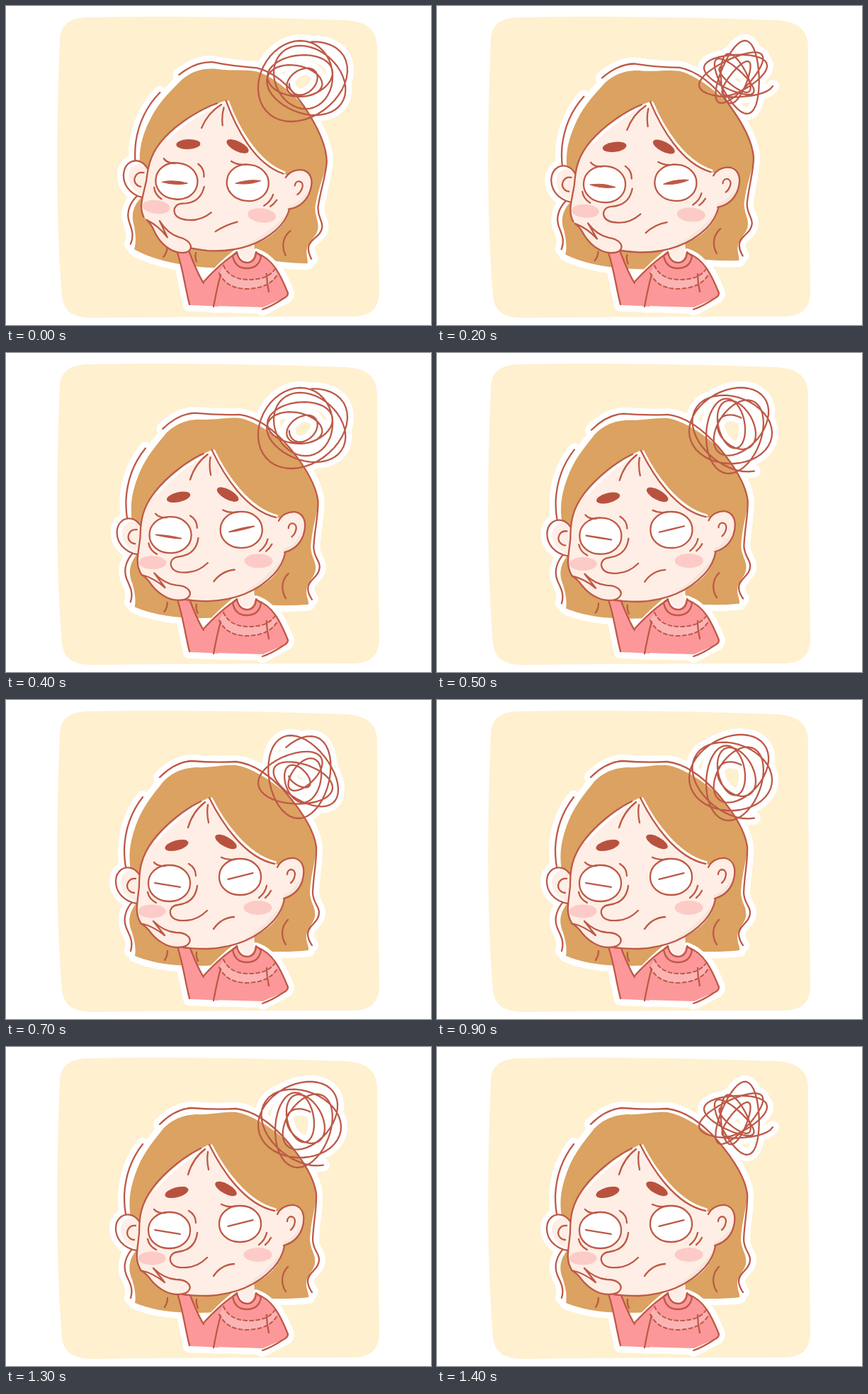
Write an HTML page that moves like this. It is 600 by 450 pixels and loops after 1500 ms.

```html
<!DOCTYPE html>
<html lang="en">
<head>
<meta charset="utf-8">
<title>Tired girl</title>
<style>
  html, body { margin: 0; width: 100%; height: 100%; overflow: hidden; background: #fff; }
  svg { display: block; width: 600px; height: 450px; }
  .line { fill: none; stroke: #be5947; stroke-width: 2.3; stroke-linecap: round; stroke-linejoin: round; }
  .halo { fill: #fff; stroke: #fff; stroke-width: 18; stroke-linecap: round; stroke-linejoin: round; }
  .open { fill: none; }
  .gap { fill: none; stroke: #fff; stroke-width: 3.5; stroke-linecap: round; }
  .wide { stroke-width: 8; }
  .hair { fill: #dba261; }
  .skin { fill: #feeee5; }
  .shade { fill: #f6e6da; }
  .blush { fill: #fccbc7; }
  .white { fill: #fff; }
  .knit { fill: #fc9899; }
  .band { fill: #fbb4b4; }
  .brow { fill: #b8523f; }
  .dash { stroke-dasharray: 5 4; stroke-width: 2; }
</style>
</head>
<body>
<svg viewBox="0 0 600 450">
  <defs>
    <path id="hair" d="M222 115C236 101 250 96 268 95C290 96 305 91 325 92C345 95 375 113 395 132C420 158 435 185 438 206C438 225 430 245 429 272C430 288 438 292 436 306C433 318 424 322 424 334C424 343 428 348 427 353Q392 357 345 353L322 352L300 374Q225 379 182 361C184 350 181 338 178 328C171 312 174 298 186 284L188 245L176 240C172 215 176 195 186 170C195 148 208 133 222 115Z"/>
    <path id="locks" d="M217 109C230 96 244 87 262 86C285 88 305 88 325 87C350 90 375 108 397 133C420 160 435 185 438 207C439 228 434 245 433 272C434 288 442 290 442 300C442 314 426 318 426 330C426 338 429 341 432 346M193 137C175 160 168 185 167 210C167 222 168 232 170 240M180 283C170 293 164 308 170 322C175 333 180 341 176 354"/>
    <path id="earL" d="M188 246C181 236 171 234 163 239C152 247 153 264 162 275C169 283 177 286 185 287"/>
    <path id="earR" d="M383 236C387 227 397 222 407 223C420 226 423 240 418 256C413 270 403 277 392 280"/>
    <path id="sleeve" d="M242 348L258 345C264 360 270 377 279 391L303 368L300 424L259 421C252 393 250 372 242 348Z"/>
    <path id="torso" d="M279 389C291 376 308 359 326 348L352 348C376 355 388 380 398 405Q398 410 390 413L363 425L259 422Z"/>
    <path id="collar" d="M326 347C328 358 334 362 341 362C348 362 353 356 353 347L360 353C358 365 350 370 340 370C329 370 322 364 320 352Z"/>
  </defs>

  <path fill="#fff0d0" d="M76 48Q76 18 112 16Q300 13 480 20C508 22 524 32 524 60Q524 230 527 405C526 425 516 438 490 438Q300 438 125 440C92 440 82 430 79 410Q67 260 76 48Z"/>

  <g class="halo">
    <path class="open tangle"/>
    <g class="tilt">
      <use href="#hair"/><use href="#locks" class="open"/>
      <use href="#earL"/><use href="#earR"/>
    </g>
    <use href="#sleeve"/><use href="#torso"/>
    <path d="M362 428L396 410"/>
  </g>

  <g class="tilt">
    <use href="#hair" class="hair"/>
    <use href="#locks" class="line"/>
    <path class="line" d="M228 354Q228 361 224 367M269 356Q268 362 271 368M398 310C388 320 388 334 395 345"/>
  </g>

  <path class="gap wide" d="M284 386C296 372 310 359 325 347M353 346Q374 353 385 374"/>
  <use href="#torso" class="knit"/>
  <use href="#sleeve" class="knit"/>
  <path class="white" d="M323 335L325 349Q331 361 341 361Q350 358 351 348L350 330Z"/>
  <path class="skin" d="M328 335L329 350Q334 359 341 359Q348 356 350 348L349 330Z"/>
  <path class="band" d="M307 366C314 382 329 386 342 386C360 386 372 382 380 371L383 379C374 394 357 399 338 399C319 398 308 391 301 377Z"/>
  <use href="#collar" class="knit"/>
  <use href="#collar" class="line"/>
  <path class="line dash" d="M307 366C314 382 329 386 342 386C360 386 372 382 380 371M301 377C308 391 319 398 338 399C357 399 374 394 383 379"/>
  <path class="line" d="M242 348C250 372 252 393 259 421M258 345C264 360 270 377 279 391M279 389C291 376 308 359 326 348M303 379C299 393 296 408 293 424M368 378Q368 390 371 403M355 349C377 357 388 380 398 405Q398 410 391 413C382 419 374 424 362 428"/>

  <g class="tilt">
    <use href="#earL" class="white"/>
    <path class="skin" d="M190 248C180 237 171 240 165 247C158 259 163 277 187 286Z"/>
    <use href="#earL" class="line"/>
    <path class="line" d="M183 252C172 251 168 263 174 269Q177 272 181 272"/>

    <path class="skin" d="M286 138C262 148 228 172 207 199C190 222 188 240 188 262C186 285 181 300 190 314L225 336C240 346 262 351 285 351C325 349 355 336 378 311C386 302 391 292 393 281L400 235L379 231C345 222 310 180 286 138Z"/>
    <path class="shade" d="M393 283C378 304 361 322 335 338C365 332 389 309 393 283Z"/>
    <use href="#earR" class="skin"/>
    <path class="shade" d="M416 250C411 262 402 271 391 275L392 281C405 277 415 267 416 250Z"/>
    <path class="gap" d="M286 141C262 151 230 176 211 200M290 139C306 171 339 219 380 229"/>
    <path class="line" d="M275 143C254 153 225 175 207 199C190 222 188 240 188 262C186 285 181 300 190 314M250 349C262 351 272 351 285 351C325 349 355 336 378 311C386 302 391 292 393 281M287 138C304 172 336 222 379 231"/>
    <path class="line" d="M281 144C268 154 261 166 257 180M285 148Q283 160 286 173M397 246C397 237 408 237 408 246Q407 254 402 258"/>
    <use href="#earR" class="line"/>

    <ellipse class="blush" cx="206" cy="298" rx="19.5" ry="9.5"/>
    <ellipse class="blush" cx="355.5" cy="293" rx="20" ry="10"/>

    <ellipse id="browL" class="brow" rx="17" ry="7"/>
    <ellipse id="browR" class="brow" rx="17" ry="7"/>

    <g class="line" style="fill:#fff">
      <rect x="201" y="233" width="59" height="51" rx="28" ry="25"/>
      <rect x="301" y="224" width="59" height="51" rx="28" ry="25"/>
    </g>
    <path id="slitL" class="line" style="fill:#be5947"/>
    <path id="slitR" class="line" style="fill:#be5947"/>
    <path class="line" d="M209 229Q214 235 225 234M304 222Q314 227 326 224M258 231Q268 237 268 248M200 271Q202 281 212 286M357 279Q366 272 368 262M366 279Q371 275 374 269"/>
    <path class="line" d="M270 262C268 279 258 287 243 289C234 290 231 296 232 301C234 310 243 312 255 311Q271 310 284 297"/>
    <path class="line" id="mouth"/>
  </g>

  <path id="hand" class="line" style="fill:#feeee5" d="M190 315C203 318 213 323 224 332L208 312C218 322 228 327 240 328C254 328 262 335 259 342C256 348 247 349 242 349C228 349 214 340 205 329C200 322 196 318 190 315Z"/>
  <path class="line tangle"/>
</svg>
<script>
  const STEP = 100, STEPS = 15, SINK = 6;

  const TANGLES = [
    tangle({ x: 356, y: 49, w: 126, h: 114, turns: 6.3, squash: .78, spin: 1.2, end: .3, phase: 2.4 }),
    tangle({ x: 356, y: 49, w: 117, h: 121, turns: 6.2, squash: .72, spin: 1.1, end: .35, phase: .6 }),
    tangle({ x: 370, y: 49, w: 104, h: 103, turns: 7.5, squash: .5, spin: 1.9, end: .5, phase: 3.3 }),
    tangle({ x: 356, y: 50, w: 113, h: 117, turns: 6.6, squash: .65, spin: 1.5, end: .25, phase: 5.2 })
  ];

  // Turning, shrinking ellipse with a drifting centre, fitted to a box
  function tangle({ x, y, w, h, turns, squash, spin, end, phase }) {
    const pts = Array.from({ length: 241 }, (_, i) => {
      const t = i / 240;
      const a = phase + 2 * Math.PI * turns * t;
      const tilt = phase - Math.PI * spin * t;
      const size = 1 - (1 - end) * t;
      const u = size * Math.cos(a), v = size * squash * Math.sin(a);
      const drift = .22 * Math.sin(Math.PI * t);
      return [
        u * Math.cos(tilt) - v * Math.sin(tilt) + drift * Math.cos(a / 2.7),
        u * Math.sin(tilt) + v * Math.cos(tilt) + drift * Math.sin(a / 2.7)
      ];
    });
    const fit = (k, from, length) => {
      const all = pts.map(p => p[k]);
      const min = Math.min(...all), max = Math.max(...all);
      return all.map(n => (from + (n - min) / (max - min) * length).toFixed(1));
    };
    const xs = fit(0, x, w), ys = fit(1, y, h);
    return 'M' + xs.map((n, i) => n + ' ' + ys[i]).join('L');
  }

  const $ = id => document.getElementById(id);
  const tilted = document.querySelectorAll('.tilt');
  const tangles = document.querySelectorAll('.tangle');
  const place = (id, x, y, angle) => $(id).setAttribute('transform', `translate(${x} ${y}) rotate(${angle})`);
  const start = performance.now();
  let shown = -1;

  function draw(step) {
    // rise: 1 with the head up, 0 once it rests on the hand
    const p = Math.min(1, step / SINK);
    const rise = (1 + Math.cos(Math.PI * p ** .75)) / 2;
    const squint = Math.min(1, rise * 2.5);

    tilted.forEach(g => g.setAttribute('transform', `rotate(${6.5 * rise} 337 344)`));
    tangles.forEach(path => path.setAttribute('d', TANGLES[step % TANGLES.length]));
    $('hand').setAttribute('transform', `rotate(${13.5 * rise} 250 345)`);
    $('mouth').setAttribute('d', `M293 323Q${304 + 2 * rise} ${307 + 5 * rise} 322 306`);

    place('browL', 241, 205, -15 + 6 * rise);
    place('browR', 310.5, 200, 29 - 9 * rise);
    place('slitL', 228, 261, 9.5 - 13 * rise);
    place('slitR', 331, 248.5, -14 + 1.5 * rise);
    const h = 4.5 * squint;
    for (const id of ['slitL', 'slitR']) {
      $(id).setAttribute('d', `M-18 0Q0 ${-h} 18 0Q0 ${h} -18 0Z`);
      $(id).style.strokeWidth = 2.3 - 1.2 * squint;
    }
  }

  function tick() {
    const step = Math.floor((performance.now() - start) / STEP) % STEPS;
    if (step !== shown) draw(shown = step);
    requestAnimationFrame(tick);
  }
  tick();
</script>
</body>
</html>
```
